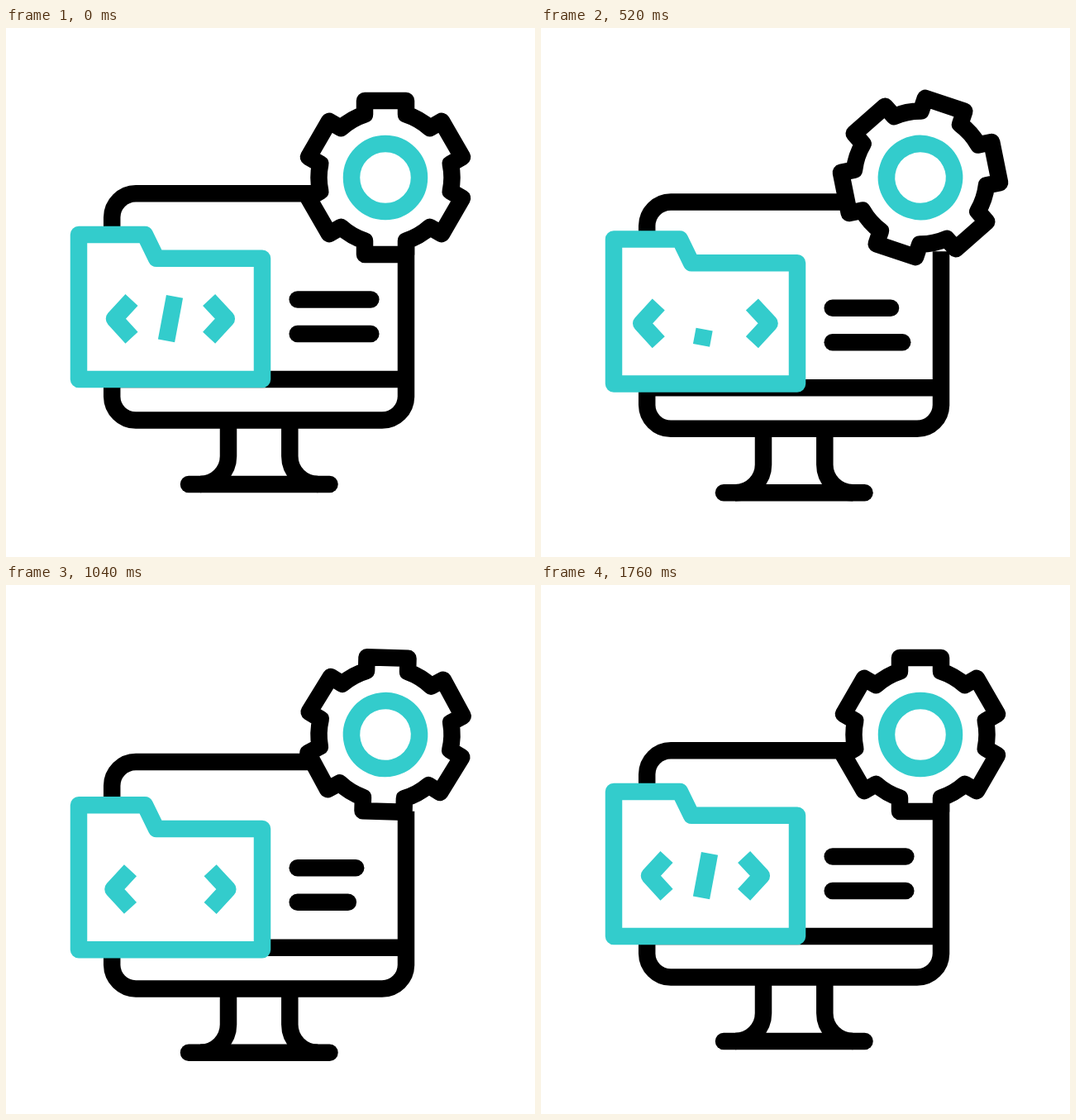
An HTML page with a canvas for the animation above (2000 ms loop, 640 by 640 pixels).

```html
<!DOCTYPE html>
<html lang="en">
<head>
<meta charset="utf-8">
<title>Code folder, monitor and gear</title>
<style>
  html, body { margin: 0; width: 100%; height: 100%; overflow: hidden; background: #fff; }
  canvas { display: block; width: 640px; height: 640px; }
</style>
</head>
<body>
<canvas id="stage" width="640" height="640"></canvas>
<script>
const ctx = document.getElementById('stage').getContext('2d');
const BLACK = '#000', TEAL = '#33cccc';
const LOOP = 2000, STEP = 40, LAST = 1760;

// Symmetric ease in and out, a cubic bezier (s, 0, 1 - s, 1)
function ease(x, s = 0.5) {
  if (x <= 0) return 0;
  if (x >= 1) return 1;
  let lo = 0, hi = 1;
  for (let i = 0; i < 30; i++) {
    const u = (lo + hi) / 2, v = 1 - u;
    if (3 * s * u * v * v + 3 * (1 - s) * u * u * v + u * u * u < x) lo = u;
    else hi = u;
  }
  return lo * lo * (3 - 2 * lo);
}

const ramp = (t, from, to, s) => ease((t - from) / (to - from), s);

// Rises from 0 to 1 at the peak, then falls back
const swing = (t, from, peak, to, s) => ramp(t, from, peak, s) - ramp(t, peak, to, s);

function stroke(path, color) {
  ctx.strokeStyle = color;
  ctx.stroke(path);
}

function line(color, ...pts) {
  const p = new Path2D();
  pts.forEach(([x, y]) => p.lineTo(x, y));
  stroke(p, color);
}

function shifted(x, y, draw) {
  ctx.save();
  ctx.translate(x, y);
  draw();
  ctx.restore();
}

function makeGear() {
  const p = new Path2D(), inner = 80.5, half = Math.asin(25 / inner);
  for (let i = 0; i < 6; i++) {
    const a = i * Math.PI / 3, c = Math.cos(a), s = Math.sin(a);
    const put = (x, y) => p.lineTo(x * c - y * s, x * s + y * c);
    put(-25, -93);
    put(25, -93);
    const start = a - Math.PI / 2 + half;
    p.arc(0, 0, inner, start, start + Math.PI / 3 - 2 * half);
  }
  p.closePath();
  return p;
}

const gear = makeGear();
const ring = new Path2D();
ring.arc(0, 0, 41, 0, Math.PI * 2);
const screen = new Path2D('M384 200.2H157A29 29 0 0 0 128.2 229V446A29 29 0 0 0 157 474.6H455A29 29 0 0 0 484 446V260');
const legs = new Path2D('M269 476V518A34 34 0 0 1 235 552M343.3 476V518A34 34 0 0 0 377.3 552');
const folder = new Path2D('M88 250H168L182 278.8H310V425H88Z');

function monitor(t) {
  ctx.lineCap = 'butt';
  stroke(screen, BLACK);
  stroke(legs, BLACK);
  line(BLACK, [128, 425], [484, 425]);
  ctx.lineCap = 'round';
  line(BLACK, [221, 552], [391.5, 552]);
  [328.5, 370].forEach((y, i) => {
    const cut = 29 * swing(t - 160 * i, 200, 765, 1395);
    line(BLACK, [352.7, y], [441.3 - cut, y]);
  });
}

function codeFolder(t) {
  ctx.fillStyle = '#fff';
  ctx.fill(folder);
  stroke(folder, TEAL);
  const d = 10.6 * swing(t, 90, 640, 1200);
  line(TEAL, [152 - d, 329], [131 - d, 351.8], [152 - d, 374.7]);
  line(TEAL, [245.6 + d, 329], [266.8 + d, 351.8], [245.6 + d, 374.7]);
  const len = 1 - swing(t, 360, 640, 640) - 0;
  const shown = t < 640 ? len : ramp(t, 1040, 1180);
  if (shown > 0.001) line(TEAL, [194, 378.4], [194 + 10 * shown, 378.4 - 53.6 * shown]);
}

function wheel(t) {
  ctx.rotate(Math.PI * ramp(t, 80, 1735, 0.565));
  ctx.fillStyle = '#fff';
  ctx.fill(gear);
  stroke(gear, BLACK);
  stroke(ring, TEAL);
}

function draw(t) {
  ctx.fillStyle = '#fff';
  ctx.fillRect(0, 0, 640, 640);
  ctx.lineWidth = 20.5;
  ctx.lineJoin = 'round';
  shifted(0, 15.7 * swing(t, 80, 840, 1600), () => monitor(t));
  shifted(0, 16.8 * swing(t, 222, 932, 1600, 0.55), () => codeFolder(t));
  shifted(459, 181, () => wheel(t));
}

const origin = performance.now();
function tick() {
  const t = (performance.now() - origin) % LOOP;
  draw(Math.min(LAST, Math.floor(t / STEP) * STEP));
  requestAnimationFrame(tick);
}
tick();
</script>
</body>
</html>
```
